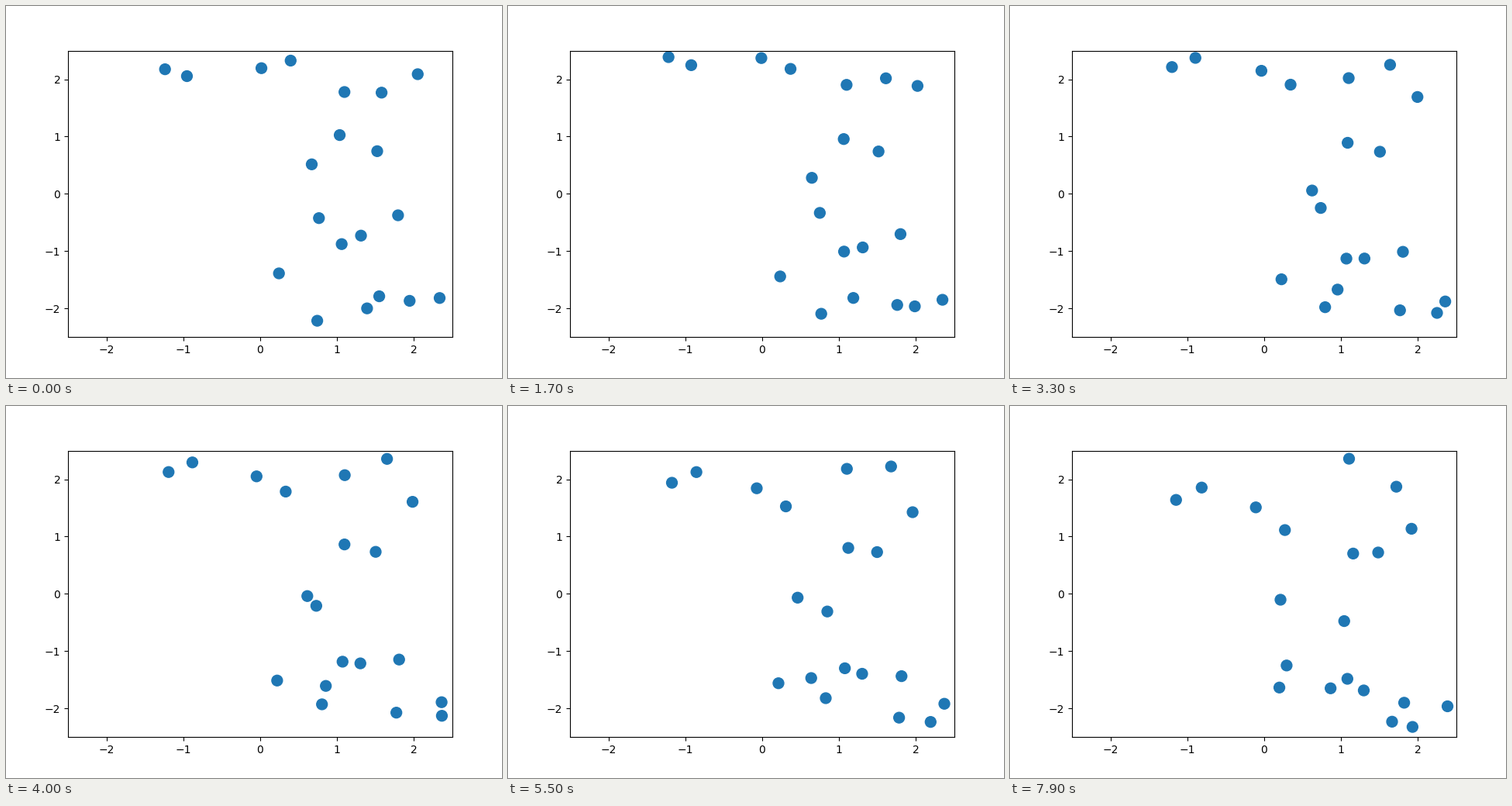
Recreate the animation shown at these times as a matplotlib script. Size 640 by 480 pixels, loop 8000 ms.

```python
import numpy as np
import matplotlib.pyplot as plt
from matplotlib.animation import FuncAnimation

FRAMES = 80
INTERVAL = 100
SUBSTEPS = 100
DT = INTERVAL / 1000 / SUBSTEPS
WALL = 2.4
DIAMETER = 0.2

# starting x, y, vx, vy; everything after this follows from the bounces
START = np.array([
    (-1.238, 2.175, .0116, .1247), (-.953, 2.055, .0177, .1126),
    (.016, 2.194, -.0158, .1388), (.396, 2.326, -.0160, .1722),
    (1.096, 1.778, .0010, .0735), (1.579, 1.767, .0177, .1472),
    (2.049, 2.089, -.0168, -.1206), (1.034, 1.026, .0156, -.0408),
    (1.522, .745, -.0050, -.0029), (.6704, .5154, -.0144, -.1385),
    (.7641, -.4234, -.0086, .0537), (1.793, -.374, .0035, -.1932),
    (1.311, -.729, -.0020, -.1211), (1.060, -.877, .0028, -.0767),
    (.244, -1.388, -.0059, -.0313), (.742, -2.215, .0154, .0717),
    (1.3901, -1.9990, -.0054, .1825), (1.5483, -1.7878, .0251, -.1665),
    (1.9437, -1.8673, .0068, -.0546), (2.334, -1.818, .0064, -.0183),
])
PAIRS = np.triu_indices(len(START), 1)


def step(pos, vel):
    """Advance in place: move, collide equal masses, bounce off the walls."""
    pos += vel * DT
    a, b = PAIRS
    gap = pos[b] - pos[a]
    for k in np.flatnonzero((gap ** 2).sum(axis=1) < DIAMETER ** 2):
        i, j = a[k], b[k]
        normal = gap[k] / np.hypot(*gap[k])
        closing = (vel[j] - vel[i]) @ normal
        if closing < 0:
            vel[i] += closing * normal
            vel[j] -= closing * normal
    vel[(np.abs(pos) > WALL) & (pos * vel > 0)] *= -1


def simulate():
    pos, vel = START[:, :2].copy(), START[:, 2:].copy()
    path = []
    for _ in range(FRAMES):
        path.append(pos.copy())
        for _ in range(SUBSTEPS):
            step(pos, vel)
    return path


path = simulate()
fig, ax = plt.subplots(figsize=(6.4, 4.8), dpi=100)
# one size per dot keeps the dots off the pixel grid, so they glide
dots = ax.scatter(*path[0].T, s=np.full(len(START), 100), c="C0", linewidths=1)
ax.set_xlim(-2.5, 2.5)
ax.set_ylim(-2.5, 2.5)


def update(frame):
    dots.set_offsets(path[frame])
    return dots,


anim = FuncAnimation(fig, update, frames=FRAMES, interval=INTERVAL,
                     repeat=True, repeat_delay=0)
plt.show()
```
